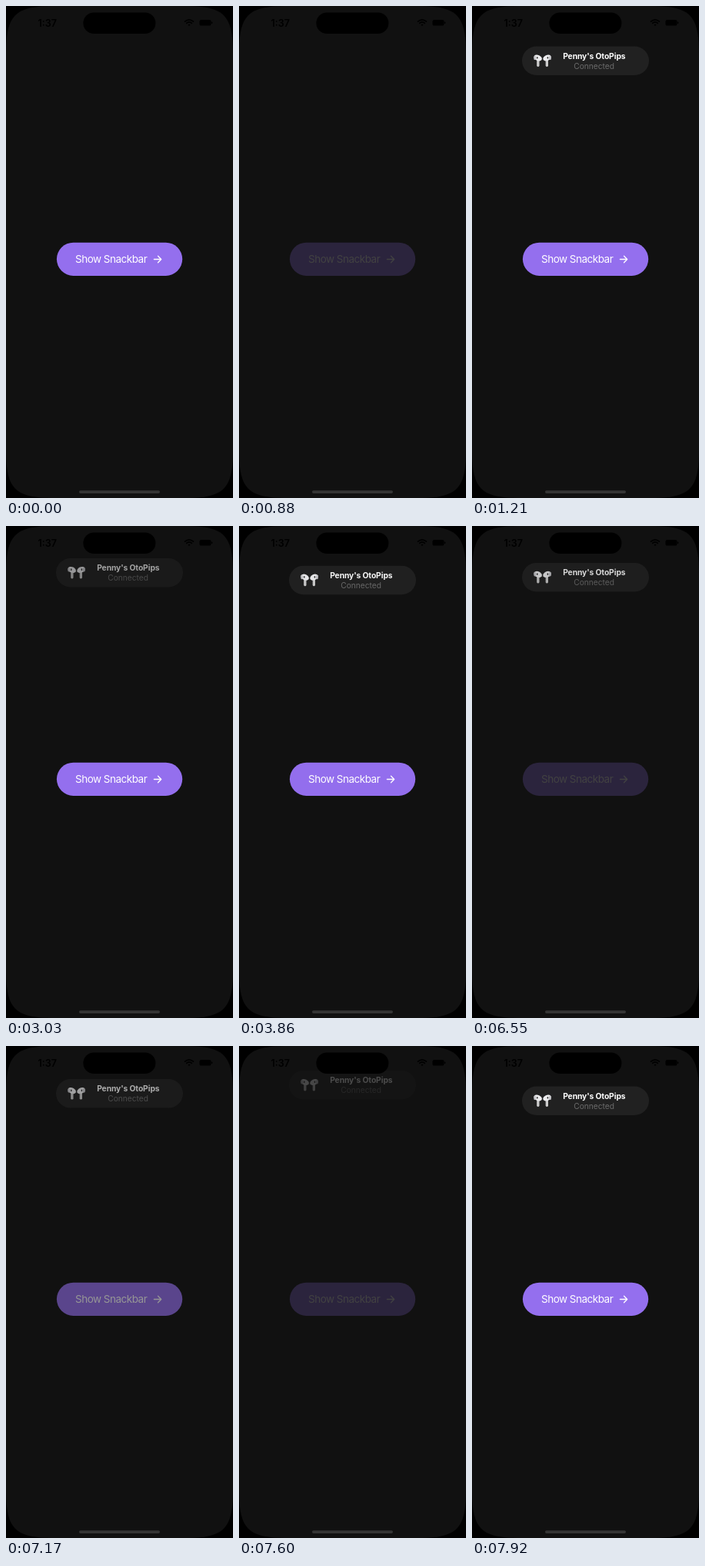
An HTML page that plays this animation: 295x640 px, repeating every 7970 ms.

```html
<!DOCTYPE html>
<html lang="en">
<head>
<meta charset="utf-8">
<title>Snackbar</title>
<style>
  html, body { margin: 0; width: 100%; height: 100%; overflow: hidden; background: #000; }
  svg { display: block; width: 100%; height: 100%; }
  text { font-family: Inter, Roboto, sans-serif; }
  .clock { font-size: 12.5px; font-weight: 600; }
  .label { font-size: 13.5px; letter-spacing: -.5px; fill: #fff; }
  .title { font-size: 10.3px; font-weight: 700; letter-spacing: -.1px; fill: #fff; text-anchor: middle; }
  .status { font-size: 10.2px; fill: #6b6b6b; text-anchor: middle; }
  .line { fill: none; stroke-linecap: round; stroke-linejoin: round; }
</style>
</head>
<body>
<svg viewBox="0 0 295 640">
  <defs>
    <g id="bud">
      <rect x="84.2" y="67" width="3.3" height="12" rx="1.4" fill="#ccc"/>
      <ellipse cx="85.7" cy="67.5" rx="5.5" ry="3.7" transform="rotate(25 85.7 67.5)" fill="#ededef"/>
      <ellipse cx="81.8" cy="67.4" rx="1.6" ry="2.7" fill="#c4c4c8"/>
      <ellipse cx="84.8" cy="67.3" rx=".8" ry="1.4" fill="#333"/>
    </g>
  </defs>

  <path fill="#111" d="M0 63C0 11.3 11.3 0 63 0H232C283.7 0 295 11.3 295 63V577C295 628.7 283.7 640 232 640H63C11.3 640 0 628.7 0 577Z"/>

  <g id="bar">
    <rect x="65" y="52.5" width="165" height="37.5" rx="18.75" fill="#212121"/>
    <use href="#bud"/>
    <use href="#bud" transform="translate(183.2 0) scale(-1 1)"/>
    <text class="title" x="158.8" y="68.6">Penny's OtoPips</text>
    <text class="status" x="158.6" y="81.8">Connected</text>
  </g>

  <text class="clock" x="41.5" y="26.5">1:37</text>
  <rect x="100.4" y="8.4" width="94" height="27.7" rx="13.85"/>
  <g class="line" stroke="#000" stroke-width="1.7">
    <path d="M232.6 20.2Q238 15.4 243.4 20.2M234.7 22.4Q238 19.4 241.3 22.4"/>
    <path d="M237.6 24.7h.8"/>
  </g>
  <rect x="251.5" y="18" width="15" height="7.6" rx="2.2"/>
  <rect x="267" y="20.5" width="1.3" height="2.6" rx=".6"/>
  <rect x="95" y="630.2" width="105" height="3.8" rx="1.9" fill="#353535"/>

  <g id="button">
    <rect x="65.9" y="307.7" width="163.3" height="43.2" rx="21.6" fill="#946fee"/>
    <text class="label" x="90" y="334.4">Show Snackbar</text>
    <path class="line" stroke="#fff" stroke-width="1.3" d="M192.4 329.5H201.6M197.5 325.3L201.7 329.5L197.5 333.7"/>
  </g>
</svg>
<script>
  const LOOP = 7970;
  const STEP = 108.75;     // the picture refreshes in coarse steps
  const TRAVEL = 27;
  const SLIDE_MS = 265;
  const RECOVER_MS = 230;
  const PRESSED = 0.2;

  // Moments that restart the refresh steps
  const bursts = [0, 880, 3030, 3500, 3750, 5720, 6100, 6330, 7050];
  // Finger down and up
  const taps = [[880, 880], [3500, 3641], [6100, 6221], [6524, 6547],
                [7050, 7050], [7459, 7480], [7590, 7660]];
  // The bar alternately appears and leaves
  const toggles = [880, 2972, 3641, 5662, 6221, 6524, 7050, 7459, 7660];

  const bar = document.getElementById('bar');
  const button = document.getElementById('button');

  const progress = (elapsed, duration) => Math.min(1, Math.max(0, elapsed / duration));
  const easeOut = u => 1 - (1 - u) ** 2;
  const easeInOut = u => u < 0.5 ? 2 * u * u : 1 - 2 * (1 - u) ** 2;

  function refreshTime(time) {
    const start = bursts.findLast(moment => moment <= time);
    return start + Math.floor((time - start) / STEP) * STEP;
  }

  function buttonOpacity(time) {
    const tap = taps.findLast(([down]) => down <= time);
    if (!tap) return 1;
    return PRESSED + (1 - PRESSED) * easeInOut(progress(time - tap[1], RECOVER_MS));
  }

  function barShown(time) {
    const index = toggles.findLastIndex(moment => moment <= time);
    if (index < 0) return 0;
    const moved = easeOut(progress(time - toggles[index], SLIDE_MS));
    return index % 2 ? 1 - moved : moved;
  }

  function draw(time) {
    const now = refreshTime(time);
    const shown = barShown(now);
    button.setAttribute('opacity', buttonOpacity(now));
    bar.setAttribute('opacity', shown);
    bar.setAttribute('transform', `translate(0 ${TRAVEL * (shown - 1)})`);
  }

  const begin = performance.now();
  function tick() {
    draw((performance.now() - begin) % LOOP);
    requestAnimationFrame(tick);
  }
  tick();
</script>
</body>
</html>
```
